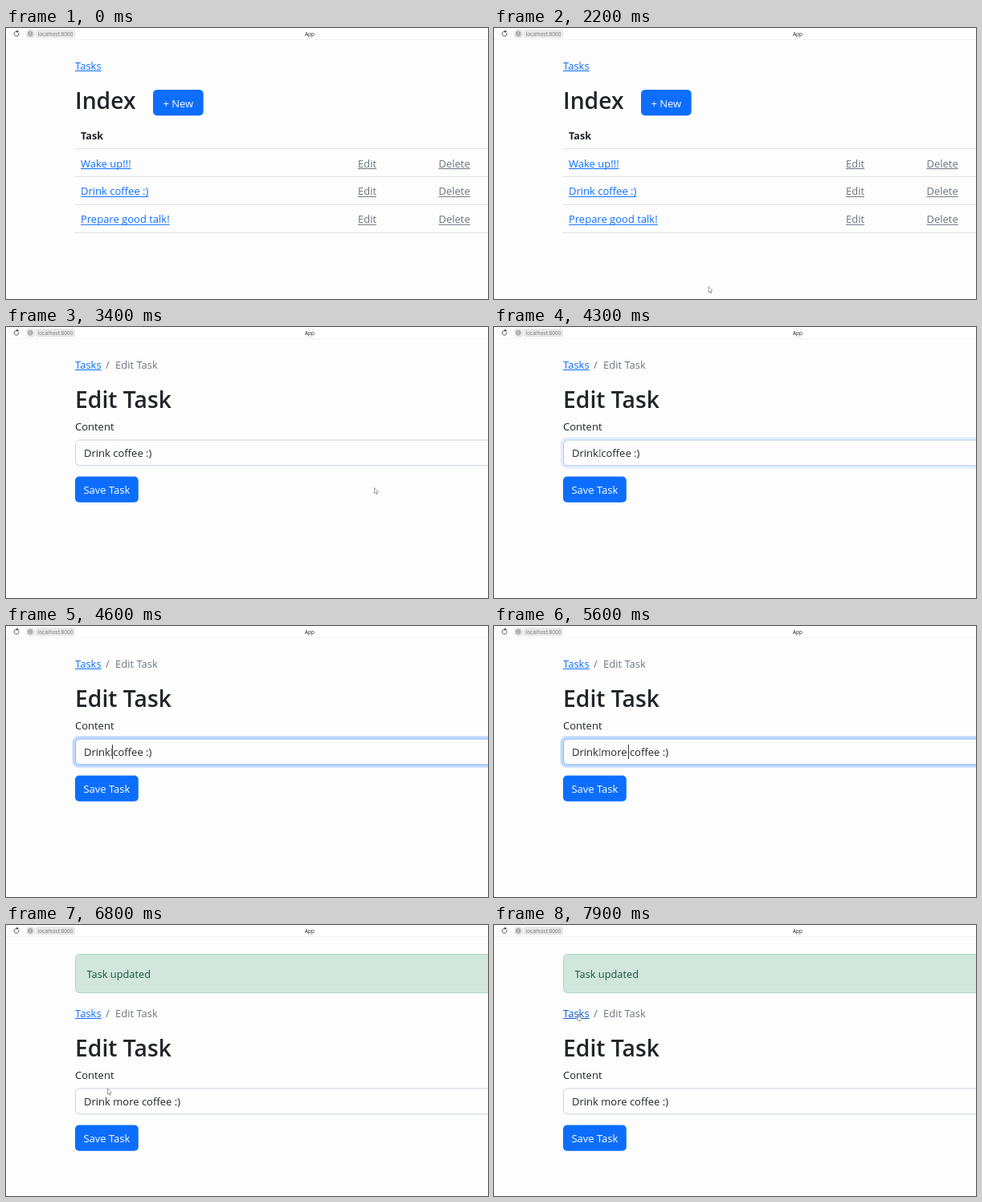
An HTML page with a canvas for the animation above (8 s loop, 600 by 338 pixels).

```html
<!DOCTYPE html>
<html lang="en">
<head>
<meta charset="utf-8">
<title>Task list</title>
<style>
  html, body { margin: 0; width: 100%; height: 100%; overflow: hidden; background: #fdfdfe; }
  canvas { display: block; width: 600px; height: 338px; }
</style>
</head>
<body>
<canvas id="stage" width="600" height="338"></canvas>
<script>
const ctx = document.getElementById('stage').getContext('2d');
const LOOP = 8000, STEP = 100;
const BLUE = '#0d6efd', HOVER = '#0b5ed7', DARK_LINK = '#0a58ca';
const INK = '#212529', GRAY = '#6c757d', LINE = '#dee2e6';
const FAMILY = '"Open Sans", "Noto Sans", sans-serif';

const clamp = v => Math.min(1, Math.max(0, v));
const progress = (t, from, to) => clamp((t - from) / (to - from));
const ease = p => p * p * (3 - 2 * p);
const mix = (a, b, p) => a + (b - a) * p;

function text(str, x, y, color = INK, size = 13, weight = 400) {
  ctx.font = `${weight} ${size}px ${FAMILY}`;
  ctx.fillStyle = color;
  ctx.fillText(str, x, y);
  return ctx.measureText(str).width;
}

function link(str, x, y, color = BLUE) {
  const width = text(str, x, y, color);
  ctx.fillRect(x, y + 1.5, width, 1);
}

function box(x, y, w, h, r, fill, stroke) {
  ctx.beginPath();
  ctx.roundRect(x, y, w, h, r);
  if (fill) { ctx.fillStyle = fill; ctx.fill(); }
  if (stroke) { ctx.strokeStyle = stroke; ctx.lineWidth = 1; ctx.stroke(); }
}

function button(label, x, y, w, fill = BLUE) {
  box(x, y, w, 32.3, 5, fill);
  ctx.textAlign = 'center';
  text(label, x + w / 2, y + 21.5, '#fff');
  ctx.textAlign = 'left';
}

function browserBar() {
  ctx.fillStyle = '#fff';
  ctx.fillRect(0, 0, 600, 14);
  ctx.fillStyle = '#f3f3f4';
  ctx.fillRect(0, 14, 600, 1);

  // reload icon
  ctx.strokeStyle = ctx.fillStyle = '#444';
  ctx.lineWidth = 0.9;
  ctx.beginPath();
  ctx.arc(13, 7.3, 2.9, -0.4, 5.1);
  ctx.stroke();
  ctx.beginPath();
  ctx.moveTo(13.2, 2.6);
  ctx.lineTo(16.2, 4.2);
  ctx.lineTo(13.4, 6);
  ctx.fill();

  // site icon and address
  box(25, 2, 11, 10.5, 3, '#e8e8e9');
  box(36.7, 2, 49.3, 10.5, 3, '#e8e8e9');
  ctx.strokeStyle = '#888';
  ctx.lineWidth = 0.7;
  ctx.beginPath();
  ctx.arc(30.3, 7.2, 2.9, 0, 7);
  ctx.moveTo(31.6, 7.2);
  ctx.ellipse(30.3, 7.2, 1.3, 2.9, 0, 0, 7);
  ctx.moveTo(27.4, 7.2);
  ctx.lineTo(33.2, 7.2);
  ctx.stroke();
  text('localhost:8000', 39.5, 9.5, '#777', 6.5);
  text('App', 372, 9.5, '#222', 6.5);
}

function indexPage(t) {
  link('Tasks', 86, 51.5);
  text('Index', 86, 101, INK, 28.3, 600);
  button('+ New', 183, 77, 62.7);
  text('Task', 93, 138.5, INK, 12.7, 700);
  ['Wake up!!!', 'Drink coffee :)', 'Prepare good talk!'].forEach((task, i) => {
    const y = 173.5 + i * 34.9;
    link(task, 93, y);
    link('Edit', 438, y, i === 1 && t >= 3000 ? '#565e64' : GRAY);
    link('Delete', 538.5, y, GRAY);
  });
  ctx.fillStyle = LINE;
  for (let i = 0; i < 4; i++) ctx.fillRect(86, Math.round(150 + i * 34.9), 514, 1);
}

function field(t, value, focus) {
  if (focus > 0) {
    box(82.6, 137.3, 560, 39.2, 8, `rgba(13,110,253,${0.25 * focus})`);
  }
  const border = [[206, 134], [212, 183], [218, 254]].map(([a, b]) => mix(a, b, focus));
  const settling = t >= 6600 && t < 6800;
  box(86.5, 141, 552, 31.8, 5, '#fdfdfe', settling && focus < 0.5 ? '#b3cbed' : `rgb(${border})`);
  text(value, 97, 162);
}

function editPage(t) {
  const saved = t >= 6800;
  const added = 'more '.slice(0, Math.max(0, Math.floor((t - 5100) / STEP)));
  const focus = progress(t, 4200, 4450) * (1 - progress(t, 6500, 6700));
  ctx.save();
  if (saved) {
    box(86.5, 36.5, 552, 48, 5, '#d1e7dd', '#a9d2bf');
    text('Task updated', 100.5, 66, '#15573a', 12.8);
    ctx.translate(0, 63);
  }
  link('Tasks', 86, 51.5, t >= 7800 ? DARK_LINK : BLUE);
  text('/', 124, 51.5, GRAY);
  text('Edit Task', 136, 51.5, GRAY);
  text('Edit Task', 86, 101, INK, 28.3, 600);
  text('Content', 86, 129);
  field(t, `Drink ${added}coffee :)`, focus);

  const caretOn = (t >= 4500 && t < 5000) || (t >= 5200 && t < 6100);
  if (caretOn) {
    ctx.font = `400 13px ${FAMILY}`;
    const x = 96.5 + ctx.measureText('Drink ' + added).width;
    ctx.fillStyle = '#333';
    ctx.fillRect(Math.floor(x) - (added ? 1 : 0), 148, 1, 18);
  }
  let fill = BLUE;
  if (t >= 6400 && t < 6700) fill = HOVER;
  else if (t >= 6700 && !saved) fill = '#6192dd';
  button('Save Task', 86, 186.5, 78.8, fill);
  ctx.restore();
}

function shape(points, x, y) {
  ctx.beginPath();
  points.forEach(([px, py]) => ctx.lineTo(x + px, y + py));
  ctx.closePath();
  ctx.fillStyle = '#fff';
  ctx.strokeStyle = '#777';
  ctx.lineWidth = 0.7;
  ctx.fill();
  ctx.stroke();
}

const ARROW = [[0, 0], [0, 7.2], [1.7, 5.8], [2.8, 8.3], [3.9, 7.8], [2.8, 5.4], [4.8, 5.2]];
const HAND = [[0, 0], [1.1, 0], [1.3, 2.8], [4.2, 3.6], [4.2, 6], [3.3, 8], [0.3, 8], [-1.8, 4.8], [-1, 4.2], [0, 5]];

function beam(x, y) {
  ctx.fillStyle = '#555';
  ctx.fillRect(x - 0.4, y - 4, 0.8, 8);
  ctx.fillRect(x - 1.5, y - 4.4, 3, 0.7);
  ctx.fillRect(x - 1.5, y + 3.7, 3, 0.7);
}

// start time, end time, then the position reached
const PATH = [[2200, 3000, 458.5, 200.5], [3400, 4200, 131.8, 157.5],
  [6100, 6500, 126.5, 204], [7200, 7900, 104.5, 111.5]];

function pointer(t) {
  if (t < 2200) return;
  let x = 267, y = 322.5;
  for (const [from, to, endX, endY] of PATH) {
    const p = ease(progress(t, from, to));
    x = mix(x, endX, p);
    y = mix(y, endY, p);
  }
  const shift = t >= 6800 ? 63 : 0;
  const overField = t >= 3400 && y > 141 + shift && y < 173 + shift;
  const overLink = (t >= 3000 && t < 3400) || t >= 7800;
  const overButton = t >= 6300 && t < 6800 && y > 186;
  if (overField) beam(x, y);
  else shape(overLink || overButton ? HAND : ARROW, x, y);
}

function draw(now) {
  const t = Math.floor((now % LOOP) / STEP) * STEP;
  ctx.fillStyle = '#fdfdfe';
  ctx.fillRect(0, 0, 600, 338);
  browserBar();
  if (t < 3400) indexPage(t);
  else editPage(t);
  pointer(t);
}

const start = performance.now();
function tick() {
  draw(performance.now() - start);
  requestAnimationFrame(tick);
}
tick();
</script>
</body>
</html>
```
